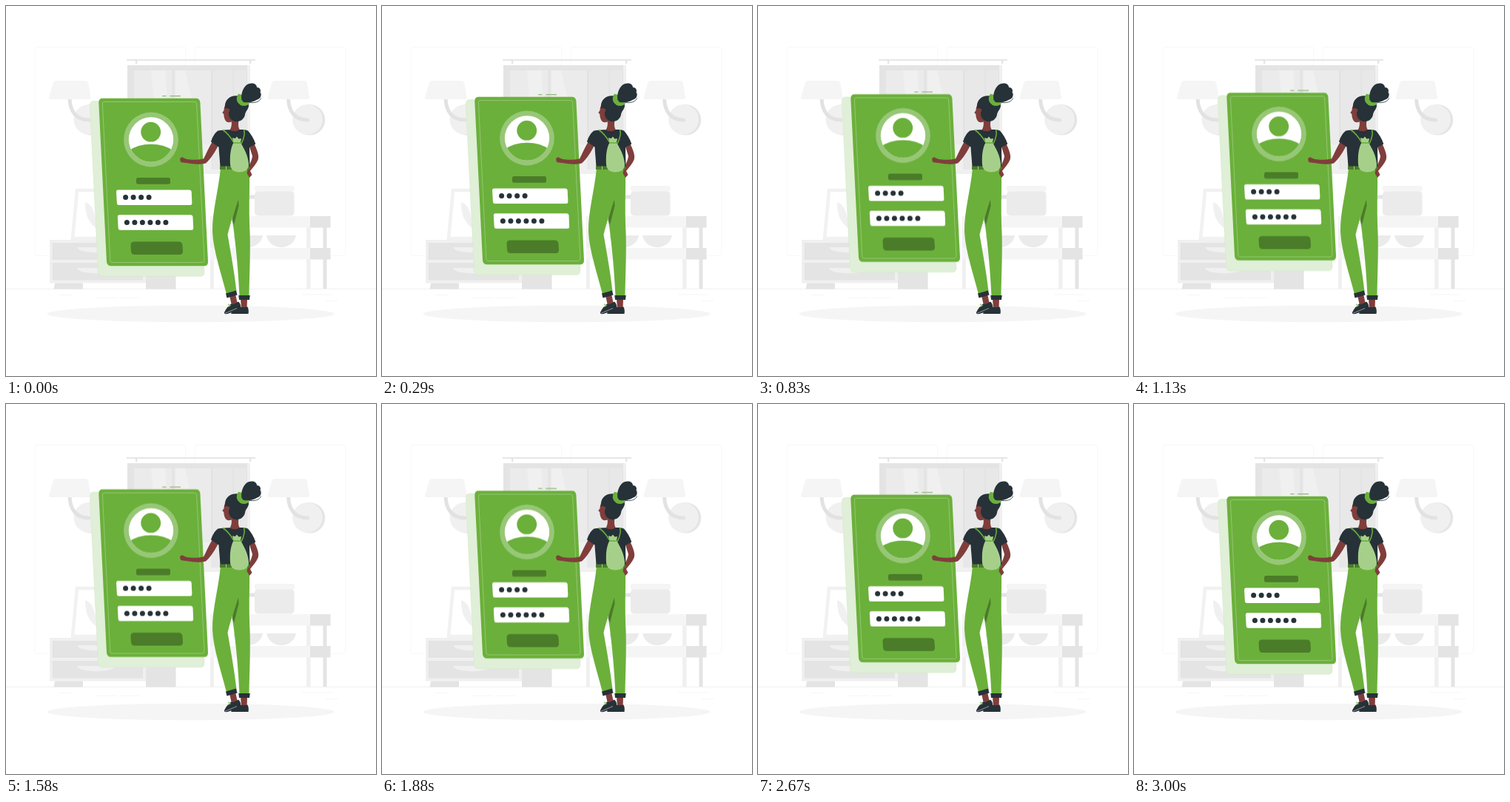
An HTML page that plays this animation: 500 px wide and 500 px high, repeating every 3.04 s.

```html
<!DOCTYPE html>
<html lang="en">
<head>
<meta charset="utf-8">
<title>Login card</title>
<style>
  html, body { margin: 0; width: 100%; height: 100%; overflow: hidden; background: #fff; }
  svg { display: block; width: 100%; height: 100%; }

  /* 24 steps a second: 1.5 s up, 1.5 s down, then one held step */
  .card { animation: float 3.04s -5ms infinite; }
  @keyframes float {
    0% { transform: translateY(0); animation-timing-function: steps(36, end); }
    49.342% { transform: translateY(-10px); animation-timing-function: steps(36, end); }
    98.684%, 100% { transform: translateY(0); }
  }

  .green { fill: #6bb03b; }
  .deep { fill: #4b7c29; }
  .pale { fill: #a6d08a; }
  .dark { fill: #263238; }
  .skin { fill: #7f3e3b; }
  .g1 { fill: #f5f5f5; }
  .g2 { fill: #f0f0f0; }
  .g3 { fill: #ebebeb; }
  .g4 { fill: #e4e4e4; }
</style>
</head>
<body>
<svg viewBox="0 0 500 500">
  <defs>
    <clipPath id="face"><circle cx="196" cy="180.5" r="30.2"/></clipPath>
    <g id="lamp">
      <circle cx="410.5" cy="153.8" r="20.7" class="g4"/>
      <circle cx="407.5" cy="153.4" r="20.4" class="g2"/>
      <path d="M381.5 125C382 143 391 154 407.500 154" fill="none" stroke="#e2e2e2" stroke-width="5" stroke-linecap="round"/>
      <path d="M362.500 101H403.500Q406 101 406.600 103.500L410 123Q410.400 126 407.500 126H356Q353 126 353.600 123L359.500 103.500Q360.300 101 362.500 101Z" class="g1"/>
    </g>
  </defs>

  <g class="room">
    <g fill="none" stroke="#f6f6f6" stroke-width=".8">
      <rect x="39" y="55.300" width="203.500" height="282" rx="2"/>
      <rect x="255" y="55.300" width="203.500" height="282" rx="2"/>
    </g>
    <g stroke="#ebebeb" stroke-width=".7">
      <path d="M0 382.400H500"/>
      <path d="M72 390.500H88M120 394.300H151M154 394.300H180M400 389.800H440M432 398.500H448" stroke="#f2f2f2"/>
    </g>

    <!-- window -->
    <rect x="164" y="80" width="166" height="147" class="g2"/>
    <rect x="164" y="80" width="165" height="107" class="g4"/>
    <rect x="173" y="87" width="51" height="100" class="g3"/>
    <rect x="228" y="87" width="49.500" height="100" class="g3"/>
    <rect x="279" y="87" width="46" height="134" fill="#e8e8e8"/>
    <path d="M196 87H215L218 130H200ZM229 87H242L252 130H229Z" class="g2"/>
    <path d="M278.300 87V221M307 87V221" stroke="#dedede" stroke-width=".8"/>
    <rect x="326" y="80" width="3.500" height="147" class="g2"/>
    <rect x="163" y="72" width="174" height="1.800" class="g4"/>
    <path d="M175 73H177.200V78H175ZM329 73H331.200V78H329Z" class="g4"/>

    <use href="#lamp" x="-295.500"/>
    <use href="#lamp"/>

    <!-- picture -->
    <path d="M96 249H150V314H90Z" fill="#fff" stroke="#f1f1f1" stroke-width="4.500"/>
    <path d="M107 265C115 268 121 276 122 300C111 293 107 281 107 265Z" class="g2"/>

    <!-- cabinet -->
    <rect x="59" y="316" width="130" height="58.500" class="g2"/>
    <rect x="189" y="316" width="40.500" height="66.500" class="g4"/>
    <path d="M62.500 320H185V343H62.500ZM62.500 347H185V370.500H62.500Z" class="g4"/>
    <path d="M96 326H148C146 335 100 336 96 326ZM96 354H148C146 363 100 364 96 354Z" class="g2"/>
    <path d="M66 374.500H104V382.400H64.500Z" class="g4"/>

    <!-- shelves -->
    <path d="M276 284H281V382H276ZM406 284H411.500V382H406Z" class="g2"/>
    <path d="M428.500 299H433.500V382H428.500Z" class="g4"/>
    <path d="M276 284H411V299.500H276ZM276 327H411V342.500H276Z" class="g1"/>
    <path d="M411 284H438.500V299.500H411ZM411 327H438.500V342.500H411Z" class="g4"/>
    <path d="M352 310H392C388 331.500 356 331.500 352 310ZM307 310H347C343 331.500 311 331.500 307 310Z" class="g3"/>
    <rect x="327" y="255.500" width="10" height="5" class="g4"/>
    <rect x="336" y="250" width="53.500" height="33.500" rx="5" class="g3"/>
    <rect x="335.500" y="243" width="54.500" height="7.500" rx="3" class="g1"/>
    <ellipse cx="249.500" cy="416" rx="194" ry="11.300" class="g1"/>
  </g>

  <g class="card">
    <path d="M118.500 128.500H252Q257 128.500 257.300 134L268 359.500Q268 365.300 263 365.300H130Q125 365.300 124.500 359.500L113.300 134Q113.300 128.500 118.500 128.500Z" fill="#e0efd7" stroke="#cfe3c2" stroke-width=".4"/>
    <path d="M130.500 124.800H256.500Q262 124.800 262.400 130.500L273 345.500Q273.100 351.300 268 351.300H142Q136.500 351.300 136 345.500L125.300 130.500Q125.300 124.800 130.500 124.800Z" class="green"/>
    <path d="M132.500 129.500H255Q257.400 129.500 257.600 132L268 343.500Q268 346.500 265.500 346.500H143.500Q141 346.500 140.800 344L130.400 132Q130.300 129.500 132.500 129.500Z" fill="none" stroke="#a6d08a" stroke-width=".7"/>
    <path d="M211.300 121.700H216.500M221.300 121.700H236" stroke="#93b480" stroke-width="1.300"/>

    <circle cx="196" cy="180.500" r="36.900" fill="#97c776"/>
    <circle cx="196" cy="180.500" r="30.200" fill="#fff"/>
    <g class="green" clip-path="url(#face)">
      <circle cx="195.700" cy="170.200" r="13.400"/>
      <path d="M165 196Q178 186.700 196 186.700T227 196V212H165Z"/>
    </g>

    <rect x="176" y="232" width="46" height="8.800" rx="2.500" class="deep"/>
    <path d="M151 248.500H248Q250.500 248.500 250.700 251L251.400 266.500Q251.400 269 249 269H152.500Q150 269 149.900 266.500L149 251Q149 248.500 151 248.500Z" fill="#fff"/>
    <path d="M152.800 282.300H249.800Q252.300 282.300 252.500 284.800L253.200 300.300Q253.200 302.800 250.800 302.800H154.300Q151.800 302.800 151.700 300.300L150.800 284.800Q150.800 282.300 152.800 282.300Z" fill="#fff"/>
    <g fill="none" stroke="#263238" stroke-width="7" stroke-linecap="round" stroke-dasharray="0 10.500">
      <path d="M161.600 258.600H194"/>
      <path d="M163.400 292.600H217"/>
    </g>
    <path d="M173 318.500H233.500Q238 318.500 238.400 323L239 331.500Q239 336 234.500 336H174Q169.500 336 169 331.500L168.500 323Q168.500 318.500 173 318.500Z" class="deep"/>
  </g>

  <g class="woman">
    <!-- feet -->
    <path d="M302 391L310 389L313 403L305 405ZM317 396H326L325.500 409H318Z" class="skin"/>
    <path d="M295 414C297 409 301 405 304 402.500C308 404 311 401 314 399.500C317 402 317.500 406 317 409C310 411 303 416 297 416.200Q294.500 416 295 414Z" class="dark"/>
    <path d="M304 415C306 411 312 410 316 406.500C320 408 323 407 326.500 406.500C328 410 328 413 327.500 416H306Q304 416.300 304 415Z" class="dark"/>
    <path d="M296 415.300L312 408.500" stroke="#fff" stroke-width=".5"/>
    <path d="M304 405C301 401 299 402 300 404L303 405Q299 405 300 407Z" class="pale"/>

    <!-- trousers -->
    <path d="M305 220H329C329.500 250 328 270 329.500 305C330.500 335 329 362 328.500 392H315.500C314 360 311 325 306 290Z" class="green"/>
    <path d="M314 260L314.500 270L308 296L305.500 289Z" class="deep"/>
    <path d="M290 219H329C329 238 322 250 313.500 263C307 282 303 295 299.500 309C304 335 309 362 311.500 386L298 389.500C291 362 280 330 279 305C278.500 278 287 250 290 219Z" class="green"/>
    <path d="M297 388.500L311 384.500L312.500 390.500L298.500 394.500ZM314.300 391H329.700L329 397H315Z" class="dark"/>

    <!-- arms -->
    <path d="M279 183C274 191 270.500 200 267 206.500C259 208.200 250 208 244 207L238 204.300Q234.500 205 235.300 208Q235.300 211.500 239 211.500L245 212.300C253 214 263 214.300 270 212.500C277 206 283 197 287.500 187Z" class="skin"/>
    <path d="M328 187L335 185C340 196 342.500 203 340.500 208C338 214 333 219 330 223L332.500 228L329 232L325.500 226L327 219C330 213 332.500 207 333 203Z" class="skin"/>

    <!-- shirt -->
    <path d="M286.500 168.500C295 167 304 167.500 309 167.300C316 167 322 166.500 327 168.500C331 173 335 179 337.300 186.500L329 191C329 201 329.500 211 329.500 218H289.500C289 208 288 200 287.500 190.500L277 183.500C279 177 282 171.500 286.500 168.500Z" class="dark"/>
    <path d="M289 216.500H329.500V221H289Z" class="deep"/>
    <path d="M297.500 216.500V221" stroke="#a6d08a" stroke-width="1"/>

    <!-- bag -->
    <path d="M293 167.500C300 172 304 178 307.500 184M321.500 167C323.500 173 321 180 318 186" fill="none" stroke="#6bb03b" stroke-width="1.500"/>
    <path d="M307.500 184.500C303 193 302.500 203 303 214C303.500 221 308 224.500 315 224.500C323 224.500 328 221 328 214C327.500 203 322 193 317 184.500L318 179L314.500 179.500L312 176.500L309.500 179L306 178Z" class="pale"/>
    <path d="M307 185H317.500" stroke="#6bb03b" stroke-width="1.600"/>

    <!-- head -->
    <path d="M304 150L314.500 154C313.500 160 314 164 315.500 167C312 170 306 170 302.500 167.300C305 164 305.500 158 304 150Z" class="skin"/>
    <path d="M297 132C295 135 294.800 139 294.500 141L292.300 144.300L294.300 146C294.500 151 296 156.500 300.500 157.300C306 157.500 311 153 312 146L309 133Z" class="skin"/>
    <path d="M294.800 138.300L297.500 137.300" stroke="#263238" stroke-width="1"/>
    <path d="M296 135C296 127 302 121.500 311 121.300C321 121 328 127 328 135C327.500 140 323.500 142 323 147C321.500 154 315 157 309 156C303 154 300.500 149 301 144C303 141 302.500 138.500 299 138.300Q296 138.500 296 135Z" class="dark"/>
    <path d="M314 118.800C310.500 124 310.800 130 317 134C321 136 326 135 329 132L326 129C321 129 319 125 319.500 120Z" class="green"/>
    <path d="M318.500 127C317 119 320.500 109 327 105.500C333 103 339 105 339 110C343 110 345 113.500 343.500 116.500C346 119.500 344.500 125 339.500 126.500C334 130 326 131 321 130Z" class="dark"/>
    <path d="M328 130.200C335 131.500 343 130 344.500 124.500" fill="none" stroke="#263238" stroke-width=".8"/>
  </g>
</svg>
</body>
</html>
```
